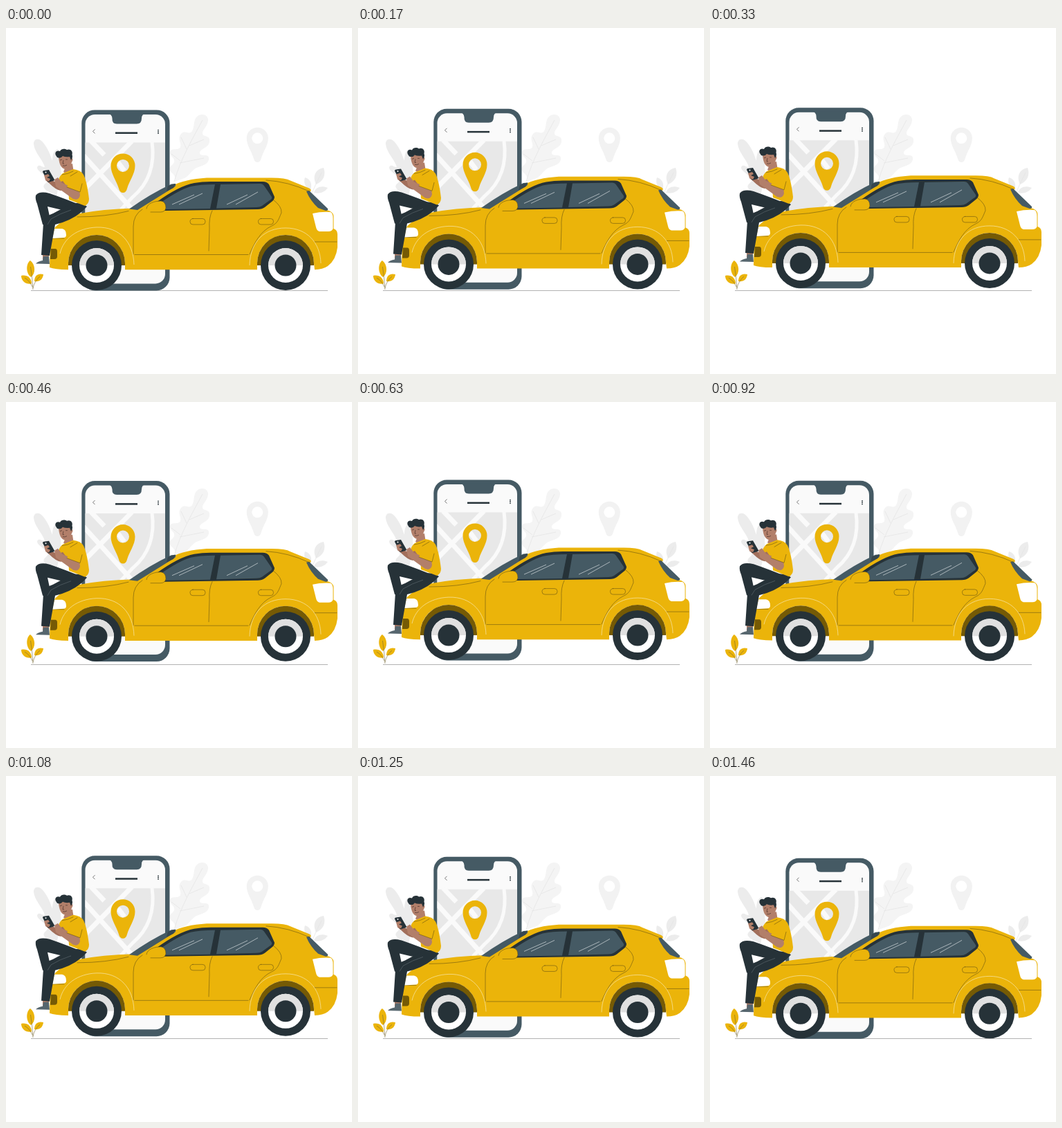
An HTML page for the animation above (1500 ms loop, 500x500 px).

```html
<!DOCTYPE html>
<html lang="en">
<head>
<meta charset="utf-8">
<title>Waiting by the car</title>
<style>
  html, body { margin: 0; width: 100%; height: 100%; overflow: hidden; background: #fff; }
  svg { display: block; width: 100%; height: 100%; }
  .yellow { fill: #ebb40a; }
  .dark { fill: #263238; }
  .slate { fill: #455a64; }
  .skin { fill: #b27f6a; }
  .pale { fill: #f4f4f4; }
  .shade { fill: #755a05; }
  .line { fill: none; stroke: #5c4c14; stroke-width: .55; stroke-linecap: round; }
  .light { fill: none; stroke: #f8e8b0; stroke-width: .7; }
</style>
</head>
<body>
<svg viewBox="0 0 500 500">
  <defs>
    <path id="pin" fill-rule="evenodd" d="M0 39C-3 39-5 37-6 33C-9 22-17.500 12-17.500 0A17.500 17.500 0 0 1 17.500 0C17.500 12 9 22 6 33C5 37 3 39 0 39ZM0-9A9 9 0 0 0 0 9A9 9 0 0 0 0-9Z"/>
    <g id="wheel">
      <circle class="dark" r="36"/>
      <circle r="25" fill="#fff"/>
      <path d="M-25 0A25 25 0 0 1 25 0Z" fill="#e0e0e0"/>
      <circle class="dark" r="15.500"/>
    </g>
    <path id="arch" d="M-41 0V-3A41 41 0 0 1 41-3V0Z"/>
    <rect id="handle" width="22" height="8.500" rx="4"/>
    <clipPath id="screen"><rect x="114.500" y="124.500" width="115.500" height="244.500" rx="14"/></clipPath>
  </defs>

  <!-- still background -->
  <g class="pale">
    <path d="M244 222C246 212 240 211 237 206C234 200 241 199 243 194C245 188 237 186 237 180C238 172 249 178 252 172C254 166 247 160 253 153C258 147 265 155 269 149C273 142 270 134 276 128C282 122 293 125 292 134C291 143 283 147 284 153C285 158 296 154 294 165C292 174 280 174 280 181C281 187 295 180 293 190C291 200 277 199 271 205C264 211 263 216 255 218Z"/>
    <path d="M40 166C41 159 49 159 54 166C61 175 64 183 67 192C67 182 70 176 75 175C81 185 78 198 80 210L73 243C68 238 58 237 55 231C52 225 63 223 60 218C57 212 46 208 45 202C46 195 53 202 56 201C54 191 40 179 40 166Z" fill="#ececec"/>
    <use href="#pin" transform="translate(363.300 159.300) scale(.89)" fill="#f2f2f2"/>
    <g fill="#ececec">
      <path d="M448 226C442 213 448 204 459 202C463 213 458 222 448 226Z"/>
      <path d="M440 234C431 230 430 222 432 216C440 218 443 226 440 234Z"/>
      <path d="M445 238C447 230 456 227 465 231C460 238 452 240 445 238Z"/>
    </g>
    <path d="M243 222C252 190 269 161 284 133M252 192L239 182M261 175L253 158M251 195L286 188M265 170L286 161M441 242Q446 228 456 209" fill="none" stroke="#e5e5e5" stroke-width=".8"/>
  </g>

  <path d="M36 379.500H465" stroke="#aaa" stroke-width=".9"/>

  <g id="float">
    <!-- big phone -->
    <g transform="translate(0 .4)">
      <rect class="slate" x="109.300" y="118" width="127.200" height="261" rx="19"/>
      <g clip-path="url(#screen)">
        <path d="M114 124H230V374H114Z" fill="#fafafa"/>
        <path d="M114 165H230V330H114Z" fill="#e8e8e8"/>
        <g fill="none" stroke="#fafafa" stroke-width="7">
          <path d="M112 184L188 268M112 234L182 163M123 163L142 183"/>
          <path d="M211 164C215 194 208 223 183 244L166 262" stroke-width="5"/>
        </g>
      </g>
      <path class="slate" d="M147 123Q153 124 153.500 130Q153 138 160 138H189Q196 138 196 130Q196 124 202 123Z"/>
      <path d="M128.500 146L125.500 149L128.500 152" fill="none" stroke="#555" stroke-width=".8"/>
      <path d="M158 151.300H190" stroke="#263238" stroke-width="2.500"/>
      <path d="M220 147.200v.01M220 149.500v.01M220 151.800v.01" stroke="#263238" stroke-width="1.800" stroke-linecap="round"/>
      <circle cx="169" cy="198.500" r="9.500" fill="#e8e8e8"/>
      <path d="M162 194L171 206" stroke="#fafafa" stroke-width="7"/>
      <use href="#pin" class="yellow" x="169" y="198.500"/>
    </g>

    <!-- car body -->
    <path class="yellow" d="M63 346L64 305Q67 292 72 287Q84 275 104 268.500Q140 261.500 184 260.500L240 228Q258 218.500 290 216.400H384Q404 216.400 411 220.500L438 231.500Q443 234 439 237L436 239L463 263Q473 265 473.500 272V290Q479 292 479 298V317Q477 335 465 344Q458 349 446 349.200L445 340A41 41 0 0 0 363 340V349.200H172V340A41 41 0 0 0 90 340V349.200Q70 349 63 346Z"/>
    <use href="#arch" class="shade" x="131" y="343"/>
    <use href="#arch" class="shade" x="404" y="343"/>
    <path class="slate" d="M178 261.500Q208 240 239 225.500L245 225Q246 228 243 230L190 263Z"/>
    <path d="M234 228L245 225L242 231L232 236Z" fill="#37474f"/>
    <path class="slate" d="M434 236L438 235L465 261Q466 264 462 264L451 260Q440 250 434 236Z"/>

    <!-- windows -->
    <path class="dark" d="M217 252Q250 228 272 224Q283 222 296 222H371Q377 222 380 226L388 244Q388 248 384 251L374 259Q370 262 364 262L229 264Z"/>
    <path class="slate" d="M224 252Q250 234 267 229Q280 226 302 226L295 261L231 262Z"/>
    <path class="slate" d="M310 226L367 225Q371 225 373 228L384 244Q385 247 381 249L370 257Q367 259 362 259L304 260.500Z"/>
    <path d="M240 255L272 241M250 255L284 239M319 255L349 241M332 255L364 237" stroke="#d7dde0" stroke-width=".7"/>
    <path class="yellow" d="M203 261C204 253 215 250 224 250Q231 251 231 260Q230 266 223 266H209Q203 266 203 261Z"/>
    <path class="line" d="M203 261C204 253 215 250 224 250Q231 251 231 260Q230 266 223 266H209"/>

    <!-- panel lines -->
    <g class="line">
      <path d="M103 273Q145 273 177 264.500M197 262Q184 270 184 287V327M186 327.500H350M298 264Q293 274 294 290L293 322"/>
      <path d="M386 248Q399 258 398 267C394 276 393 282 384 286C367 294 359 311 352 327"/>
      <path d="M376 220Q408 222 438 236M446 309H478M67 304H84"/>
      <use href="#handle" x="266" y="275.500"/>
      <use href="#handle" x="364.500" y="275.500"/>
    </g>
    <path class="light" d="M78 326C83 304 103 289 131 288C164 287 184 309 185 342M352 343C353 308 374 289 404 289C435 289 454 310 455 340"/>

    <!-- lamps -->
    <path d="M70 290H81Q87 291 87 299Q87 303 83 303L67 304Z" fill="#fff"/>
    <path d="M443 268Q456 265 469 266Q472.500 268 472.500 275V290Q471 294 466 294L453 294Q449 293 448 288Z" fill="#fff"/>
    <path class="shade" d="M65 319H71Q74 319 74 323V330Q74 334 70 334H64Z"/>
    <use href="#wheel" x="131" y="343"/>
    <use href="#wheel" x="404" y="343"/>

    <!-- man -->
    <path class="dark" d="M114 259C97 251 80 245 63 239Q48 235 43 242Q42 247 45 254L53 284L66 286L60 258L77 262L106 266Z"/>
    <path class="skin" d="M53 326H62V335H53Z"/>
    <path d="M43 340.500Q46 337 53 336L54 330H62L63 341Z" fill="#56666e"/>
    <path class="dark" d="M117 258Q108 251 94 254L68 268Q55 272 54 282L51 328L63 329L71 284Q93 279 109 266Z"/>
    <path d="M60 284L65 276Q78 268 94 263" fill="none" stroke="#59656b" stroke-width=".7"/>
    <path class="skin" d="M87 198L96 196L98 209L90 212L83 208Z"/>
    <path class="yellow" d="M82 210L97 204Q108 205 112 212Q117 222 120 247Q120 254 114 257L91 248L90 231L76 223Q75 216 82 210Z"/>
    <path d="M56 213L63 212L68 221L76 224L82 221L90 232L79 235Q72 234 62 224L57 220Z" fill="#a26f5b"/>
    <path class="skin" d="M93 229L81 224L75 216L70 219L72 229L97 247Q105 250 107 242L105 225Z"/>
    <path class="yellow" d="M97 211Q109 207 113 219L107 237L88 230Z"/>
    <path class="line" d="M81 212Q90 211 97 207M88 230L107 237L110 225M93 214L103 208"/>
    <path class="dark" d="M53 208Q53 206 55 206L62 205L70 219Q70 221 68 221L61 223Z"/>
    <circle cx="57.500" cy="208.500" r="1" fill="#fff"/>
    <path class="skin" d="M55 213L61 211L63 214L59 216L64 218L62 222L57 219Z"/>
    <path class="skin" d="M76 186L92 183Q95 184 95 188Q98 189 95 194Q93 203 86 204Q77 203 76 186Z"/>
    <path class="dark" d="M72 184C70 180 73 176 78 178C80 174 85 174 88 176C93 174 97 178 95.500 183Q97 187 94 191L92 186Q86 187 82 185Q79 189 74 187Z"/>
    <path d="M78 191L81 190M86 190L89 190M83 191L82 196L84 196M82 199Q85 200 88 198" fill="none" stroke="#593c33" stroke-width=".8"/>
  </g>

  <!-- yellow sprig -->
  <g class="yellow">
    <path d="M36 360C28 354 29 340 35 336C43 342 43 355 36 360Z"/>
    <path d="M37 369.500C29 371 22 366 22 358C30 356 37 361 37 369.500Z"/>
    <path d="M41 366C41 357 47 354 54 356C53 364 48 367 41 366Z"/>
    <path d="M39 378Q38 360 35.500 345M38 374Q34 365 27 361M39 376Q41 366 49 359" fill="none" stroke="#7a6a35" stroke-width=".6"/>
  </g>
</svg>
<script>
  const LOOP = 1500, PEAK = 710, RISE = 7, REST = 0.37;
  const float = document.getElementById('float');

  // steady rise and fall around the peak moment
  function draw(now) {
    const gap = Math.abs(now % LOOP - PEAK);
    const away = Math.min(gap, LOOP - gap) / (LOOP / 2);
    float.setAttribute('transform', `translate(0 ${REST - RISE * (1 - away)})`);
    requestAnimationFrame(draw);
  }
  draw(performance.now());
</script>
</body>
</html>
```
